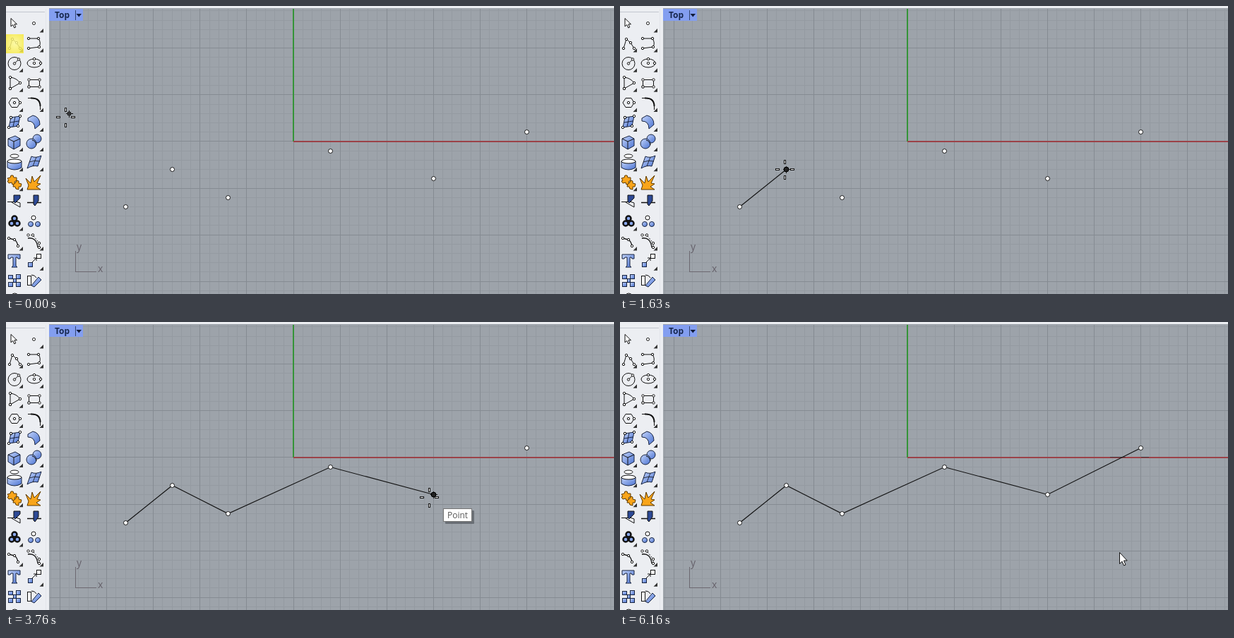
An HTML page that plays this animation: 861x408 px, repeating every 6.28 s.

```html
<!DOCTYPE html>
<html lang="en">
<head>
<meta charset="utf-8">
<title>Polyline through points</title>
<style>
  html, body { margin: 0; width: 100%; height: 100%; overflow: hidden; background: #eceef2; }
  svg { display: block; width: 861px; height: 408px; }
  text { font-family: "Open Sans", "Noto Sans", sans-serif; }
  .crisp { shape-rendering: crispEdges; }
  .ink { fill: none; stroke: #111; }
  .knots { marker: url(#knot); }
  .dot, .dot * { fill: #fff; stroke: #111; }
  .blue { fill: url(#blue); stroke: #17233f; }
  .orange { fill: #f9a51a; stroke: #5e3a00; }
</style>
</head>
<body>
<svg viewBox="0 0 861 408">
  <defs>
    <linearGradient id="blue" x2="1" y2="1">
      <stop stop-color="#c3d4fa"/><stop offset="1" stop-color="#4a72d2"/>
    </linearGradient>
    <radialGradient id="glow" r=".75">
      <stop stop-color="#fffb96"/><stop offset="1" stop-color="#f6e630"/>
    </radialGradient>
    <marker id="knot" markerUnits="userSpaceOnUse" markerWidth="6" markerHeight="6" refX="3" refY="3">
      <circle class="dot" cx="3" cy="3" r="1.700"/>
    </marker>
  </defs>

  <rect x="61" y="3" width="800" height="405" fill="#9da3aa"/>
  <g class="crisp" id="grid"></g>
  <g class="crisp">
    <rect x="406" y="4" width="2" height="188" fill="#359438"/>
    <rect x="407" y="191" width="454" height="2" fill="#9b4248"/>
    <rect id="trace1" x="694" y="191" width="22" height="1" fill="#4a3438"/>
    <rect id="trace2" x="738" y="191" width="11" height="1" fill="#4a3438"/>
    <path d="M98.500 347V376.500H128" fill="none" stroke="#6c6870"/>
  </g>
  <g fill="#65616a" font-size="14">
    <text x="100" y="346">y</text><text x="130" y="377">x</text>
  </g>

  <rect x="61" y="4" width="48" height="17" fill="#839ef0"/>
  <text x="69" y="17" font-size="12" font-weight="700" fill="#17284f">Top</text>
  <path d="M98.500 6V20" stroke="#33456f" class="crisp"/>
  <path d="M99.500 11H107L103.250 15.500Z" fill="#101a38"/>

  <g class="crisp">
    <path d="M0 8.500H55" stroke="#c3c7cf"/>
    <path d="M56.500 4V408" stroke="#e2e5ea"/>
  </g>
  <g id="corners" fill="#333"></g>

  <g>
    <path class="dot" d="M7 17.500V29L9.800 26.500 11.800 31 13.800 30 11.900 25.800H15.500Z"/>
    <circle class="dot" cx="39.500" cy="24.500" r="2"/>

    <path class="ink knots" d="M5 60L9 47 15 52 20 60"/>
    <path class="ink knots" d="M32 46H46Q50 52 47 58L32 60"/>

    <circle class="ink" cx="12" cy="81.500" r="9"/>
    <path class="ink knots" d="M12 81.500L18 75.500"/>
    <ellipse class="ink" cx="40" cy="81" rx="10" ry="6"/>
    <path class="knots" fill="none" d="M40 75V81H49"/>

    <path class="ink knots" d="M6 117V101Q15 102 20 109Z"/>
    <path class="ink knots" d="M32.500 114.500V104.500H47.500V114.500Z"/>

    <path class="ink" d="M4 137L8 130.500H16L20 137 16 143.500H8Z"/>
    <path class="knots" fill="none" d="M12 137H20"/>
    <path class="ink" d="M31 130.500H36M48.500 141V147"/>
    <path class="ink" d="M35 130.500Q48.500 130 48.500 142" stroke-width="2"/>

    <path class="blue knots" d="M7 158L20 156 17 170 4 172Z"/>
    <path d="M13 157L10 171M6 165L18 163" stroke="#17233f"/>
    <path class="blue" d="M31 159L38 155Q48 157 48 168L41 174Q41 163 31 163Z"/>

    <path class="blue" d="M3 188L13 184 20 188V198L11 203 3 198Z"/>
    <path class="ink" d="M3 188L11 192 20 188M11 192V203"/>
    <circle class="blue" cx="44" cy="188" r="6"/>
    <circle class="blue" cx="36" cy="195" r="7"/>
    <path class="ink" d="M37 190Q42 191 43 197"/>

    <ellipse class="dot" cx="12" cy="212.500" rx="6" ry="2.500"/>
    <path class="blue" d="M2 220Q12 225 22 220V229Q12 235 2 229Z"/>
    <ellipse class="dot" cx="12" cy="220" rx="10" ry="3"/>
    <path class="blue" d="M36 213Q42 216 50 212L45 227Q38 225 30 230Z"/>
    <path class="ink" d="M33 221Q40 218 48 220M43 214L38 227" stroke-width=".8"/>

    <path class="orange" d="M2 244L6 243 7 240 10 240 11 243 15 243 15 247 12 249 13 252 9 253 8 250 4 251 2 248 4 247Z"/>
    <path class="orange" d="M11 252L14 250 15 247 18 248 18 251 22 252 21 256 18 256 18 260 14 259 13 256 10 256Z"/>
    <path class="orange" d="M28 244L35 251 37 241 40 249 49 240 44 251 49 252 43 256 49 260H30L32 254Z"/>

    <path d="M11 268H20V272L13 279 11 277Z" fill="#2d4a96" stroke="#111"/>
    <path class="ink" d="M2 277.500H12M8 278L20 285V279L14 277"/>
    <path d="M39 268H46V276L41 283 39 281Z" fill="#2d4a96" stroke="#111"/>
    <path class="ink" d="M30 278.500H39M44 278.500H50" stroke-width="1.500"/>

    <g fill="#8aa9f0" stroke="#111" stroke-width="2.500"><circle cx="12" cy="301" r="3.500"/><circle cx="8" cy="308" r="3.500"/><circle cx="16" cy="308" r="3.500"/></g>
    <circle class="dot" cx="39" cy="300" r="3"/>
    <circle class="blue" cx="35" cy="309" r="3.500"/><circle class="blue" cx="45" cy="309" r="3.500"/>

    <path class="ink knots" d="M4 329L12 331Q16 334 17 340" stroke-width="1.300"/>
    <path class="ink" d="M31 329Q43 327 45 342" stroke-width="1.300"/>
    <path class="ink knots" d="M31.500 324.500H38L47 336V342" stroke-dasharray="2 2"/>

    <path class="blue" d="M3 352H20V358H17L16 356H14V368L16 370H8L10 368V356H7L6 358H3Z"/>
    <rect class="blue" x="31.500" y="363.500" width="6" height="6"/>
    <rect class="dot" x="43.500" y="351.500" width="6" height="6"/>
    <path class="ink" d="M37 363L43 357M39 357H43V361"/>

    <g class="blue"><rect x="3.500" y="381.500" width="6" height="5"/><rect x="14.500" y="380.500" width="6" height="6"/><rect x="3.500" y="391.500" width="6" height="6"/><rect x="14.500" y="391.500" width="6" height="6"/><rect x="10.500" y="386.500" width="4" height="5"/></g>
    <rect class="dot" x="30.500" y="382.500" width="5" height="13"/>
    <path class="blue" d="M46 384L50 388 40 398 36 396Z"/>
    <path class="ink" d="M36 381Q41 381 43 385M7 410Q12 404 18 410"/>
  </g>
  <rect id="hint" x="0" y="40" width="25" height="27" fill="url(#glow)"/>

  <polyline id="line" class="ink" stroke-width="1.150"/>
  <g id="points" class="dot"></g>
  <g id="marker">
    <circle id="snapDot" r="3" fill="#555" stroke="#000" stroke-width="1.500"/>
    <path class="ink crisp" d="M-5 0H5M0-5V5M-2-2H2V2H-2Z"/>
  </g>
  <g id="cross" class="dot crisp">
    <rect x="-.5" y="-13.500" width="2" height="5"/><rect x="-.5" y="8.500" width="2" height="5"/>
    <rect x="-12.500" y="-1.500" width="5" height="2"/><rect x="8.500" y="-1.500" width="5" height="2"/>
  </g>
  <g id="tip">
    <rect x="3" y="3" width="41" height="19" rx="1" fill="#3c4046" opacity=".5"/>
    <rect x=".5" y=".5" width="40" height="18" fill="#fff" stroke="#767676"/>
    <text x="6" y="13.500" font-size="12" fill="#575757">Point</text>
  </g>
  <path id="arrow" class="dot" d="M.5.5V16.500L4 13.200 6.600 19 9 18 6.500 12H11.200Z"/>
</svg>

<script>
const $ = id => document.getElementById(id);
const LOOP = 6280, TICK = 125.3, UNIT = 13.22, X0 = 407, Y0 = 191.9;
const clamp = v => Math.min(1, Math.max(0, v));
const place = (u, v) => [Math.floor(X0 + u * UNIT) + .5, Math.floor(Y0 + v * UNIT) + .5];
const points = [[-18, 7], [-13, 3], [-7, 6], [4, 1], [15, 4], [25, -1]].map(p => place(...p));

// The cursor leaves for the next stop on each click; times are in ticks.
const home = { x: 84, y: 158 };
const stops = [
  { start: 0, length: 6, x: 166, y: 287 },
  { start: 7, length: 5, x: 233, y: 232 },
  { start: 13, length: 3.5, x: 319, y: 281 },
  { start: 18, length: 5, x: 449, y: 208 },
  { start: 25, length: 3.6, x: 599, y: 249 },
  { start: 31, length: 5.3, x: 738, y: 180 }
];
const LAST_CLICK = 38, FINISH = 44, LEAVE = 49, LAG = .25;

const ease = p => 1 - (1 - p * p) ** 5;

function cursorAt(tick) {
  const i = Math.max(0, stops.findLastIndex(s => s.start <= tick));
  const from = stops[i - 1] || home, to = stops[i];
  const e = ease(clamp((tick - to.start) / to.length));
  return [from.x + (to.x - from.x) * e, from.y + (to.y - from.y) * e];
}

function buildGrid() {
  const minor = '#949aa1', major = '#858b92';
  const lines = { [minor]: '', [major]: '' };
  const add = (i, d) => lines[i % 5 ? minor : major] += d;
  for (let i = -26; i <= 34; i++) add(i, `M${place(i, 0)[0]} 4V408`);
  for (let i = -14; i <= 16; i++) add(i, `M62 ${place(0, i)[1]}H861`);
  $('grid').innerHTML = Object.entries(lines)
    .map(([color, d]) => `<path d="${d}" stroke="${color}"/>`).join('');
}

function buildCorners() {
  let d = '';
  for (let row = 0; row < 13; row++) {
    const corner = x => `M${x} ${32 + row * 28.1}v5.500h-5.500z`;
    if (row % 9 && row < 12) d += corner(24);
    if (row < 8 || row > 10) d += corner(53);
  }
  $('corners').innerHTML = `<path d="${d}"/>`;
}

const show = (id, on) => $(id).style.display = on ? '' : 'none';
const move = (id, x, y) => $(id).setAttribute('transform', `translate(${Math.round(x * 2) / 2} ${Math.round(y * 2) / 2})`);

function draw(t) {
  const tick = Math.floor((t + 16) / TICK);
  const done = tick >= FINISH;
  const clicks = tick >= LAST_CLICK ? points.length : stops.findLastIndex(s => s.start <= tick);
  const [x, y] = cursorAt(tick).map(Math.round);

  // Nearby points attract the probe; elsewhere it trails along the grid.
  const near = points.findIndex(([a, b]) => Math.hypot(a - x, b - y) < 18);
  const [lx, ly] = cursorAt(tick - LAG);
  const probe = points[near] || place(Math.round((lx - X0) / UNIT), Math.round((ly - Y0) / UNIT));

  const path = points.slice(0, clicks);
  if (clicks && !done) path.push(probe);
  $('line').setAttribute('points', path.join(' '));

  show('marker', !done);
  show('snapDot', near >= 0);
  move('marker', ...probe);
  show('cross', !done);
  move('cross', x, y);
  show('tip', !done && near >= 0 && near === clicks);
  move('tip', x + 20, y + 15);

  show('arrow', done);
  if (tick < LEAVE) move('arrow', 738, 179);
  else move('arrow', 707, 326);

  show('trace1', tick >= 34);
  show('trace2', tick >= LEAVE);
  $('hint').style.opacity = .84 * clamp((10 - tick) / 5);
}

buildGrid();
buildCorners();
$('points').innerHTML = points.map(([x, y]) => `<circle cx="${x}" cy="${y}" r="3"/>`).join('');

const start = performance.now();
function frame() {
  draw((performance.now() - start) % LOOP);
  requestAnimationFrame(frame);
}
draw(0);
frame();
</script>
</body>
</html>
```
